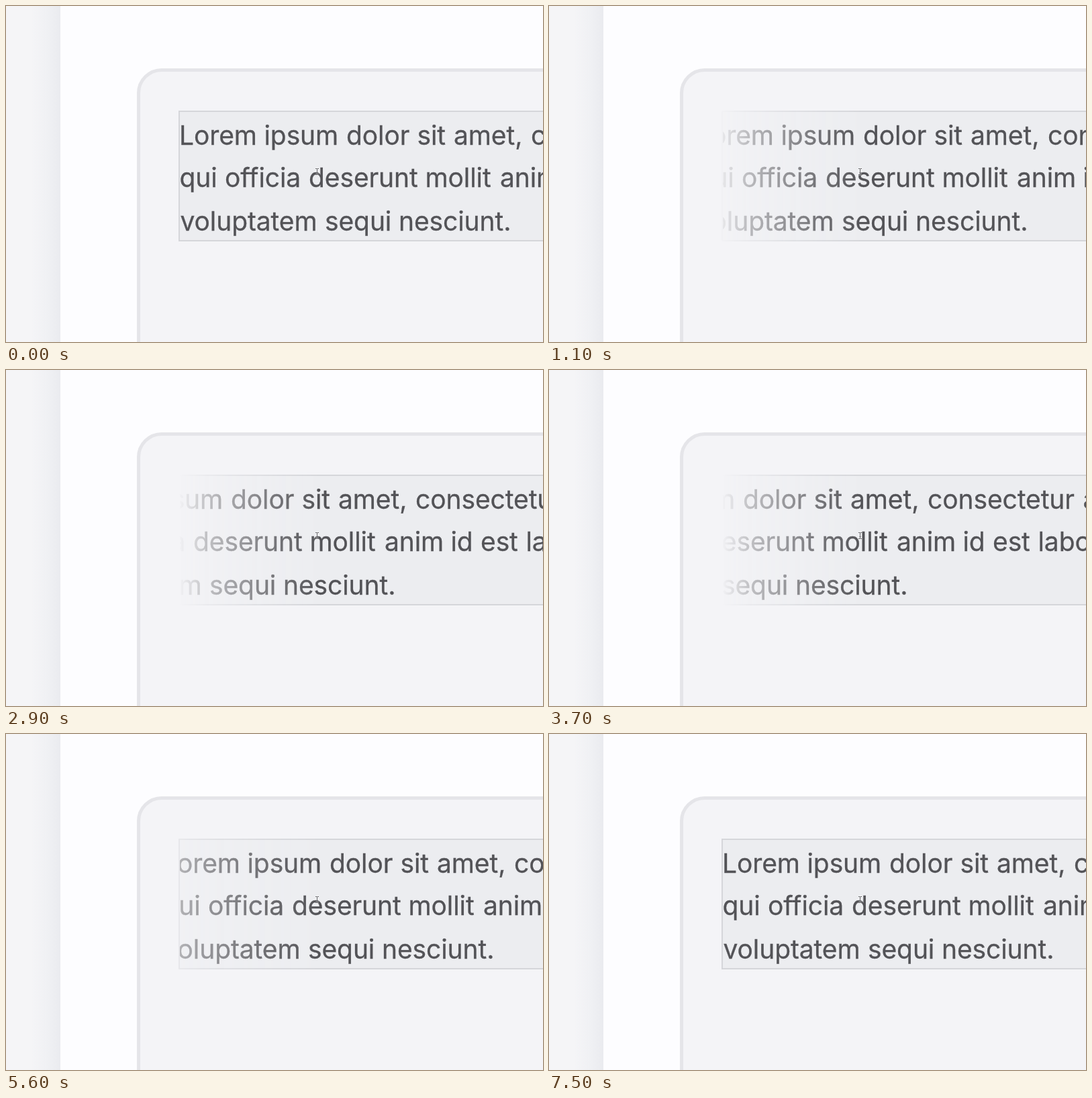
An HTML page for the animation above (8.1 s loop, 800 by 501 pixels).

```html
<!DOCTYPE html>
<html lang="en">
<head>
<meta charset="utf-8">
<title>Scroll fade</title>
<style>
  html, body { margin: 0; width: 100%; height: 100%; overflow: hidden; background: #f4f4f6; }
  #stage { position: relative; width: 800px; height: 501px; overflow: hidden; }
  #stage div, #stage svg { position: absolute; box-sizing: border-box; }
  .shade { left: 0; top: 0; width: 81px; height: 501px;
    background: linear-gradient(90deg, #f5f5f7 45%, #f0f1f4 75%, #eaebef); }
  .card { left: 81px; top: 0; width: 719px; height: 501px; background: #fdfdff; }
  .panel { left: 195px; top: 93px; width: 700px; height: 500px;
    border: 5px solid #e5e5e9; border-radius: 37px; background: #f4f4f7; }
  #box { left: 257px; top: 156px; width: 700px; height: 195px; overflow: hidden;
    border: 2px solid #d5d6da; background: #ecedf0; }
  #box svg { left: -259px; top: -158px; overflow: visible; }
  text { font: 39px Inter, "Open Sans", sans-serif; letter-spacing: -.1px;
    fill: #535357; stroke: #535357; stroke-width: .3px; }
  .cursor { left: 458px; top: 240px; }
</style>
</head>
<body>
<div id="stage">
  <div class="shade"></div>
  <div class="card"></div>
  <div class="panel"></div>
  <div id="box"><svg width="1100" height="501"><g id="copy"></g></svg></div>
  <svg class="cursor" width="11" height="14" fill="none">
    <path d="M3 2.5H5L5.5 3L6 2.5H8M5.5 3V11M3 11.5H5L5.5 11L6 11.5H8" stroke="#fff" stroke-width="2" opacity=".6"/>
    <path d="M3 2.5H5L5.5 3L6 2.5H8M5.5 3V11M3 11.5H5L5.5 11L6 11.5H8M4.5 8.5H6.5" stroke="#55555a" stroke-width=".9"/>
  </svg>
</div>
<script>
const LOOP = 8100, STEP = 100;
const box = document.getElementById('box');
const copy = document.getElementById('copy');

// Baseline, then each word with its starting x.
const lines = [
  [206.5, { Lorem: 258, ipsum: 384.5, dolor: 507, sit: 612.5, 'amet,': 667, consectetur: 782, adipiscing: 1013.5 }],
  [269.5, { qui: 258.5, officia: 326, deserunt: 451, mollit: 624.5, anim: 736, id: 834.5, est: 879, laborum: 946.5 }],
  [334.5, { voluptatem: 259.5, sequi: 475, 'nesciunt.': 585 }]
];
copy.innerHTML = lines.map(([y, words]) => Object.entries(words)
  .map(([word, x]) => `<text x="${x}" y="${y}">${word}</text>`).join('')).join('');

// Scroll distance over time: [ms, px].
const path = [[0, 0], [200, 0], [700, 16], [1100, 39], [1300, 58], [1400, 58], [2000, 110], [2900, 172],
  [3700, 218], [3900, 220], [4700, 124], [5200, 58], [5600, 25], [6100, 10], [6700, 3], [7500, 0], [LOOP, 0]];

// Opacity of the full left fade: [px from the edge, alpha].
const fade = [[0, 0], [10, .08], [42, .32], [92, .56], [142, .78], [210, 1]];

function scrollAt(t) {
  const i = path.findIndex(([end]) => end > t);
  const [t0, s0] = path[i - 1], [t1, s1] = path[i];
  return s0 + (s1 - s0) * (t - t0) / (t1 - t0);
}

function draw(now) {
  const s = scrollAt(Math.floor(now % LOOP / STEP) * STEP);
  const edge = Math.max(0, 1 - s / 42);
  const stops = fade.map(([x, a]) => `rgba(0,0,0,${(edge + (1 - edge) * a).toFixed(3)}) ${x}px`);
  const mask = `linear-gradient(90deg, ${stops.join(', ')})`;
  box.style.webkitMaskImage = mask;
  box.style.maskImage = mask;
  copy.setAttribute('transform', `translate(${-s} 0)`);
}

const start = performance.now();
function tick() {
  draw(performance.now() - start);
  requestAnimationFrame(tick);
}
tick();
</script>
</body>
</html>
```
